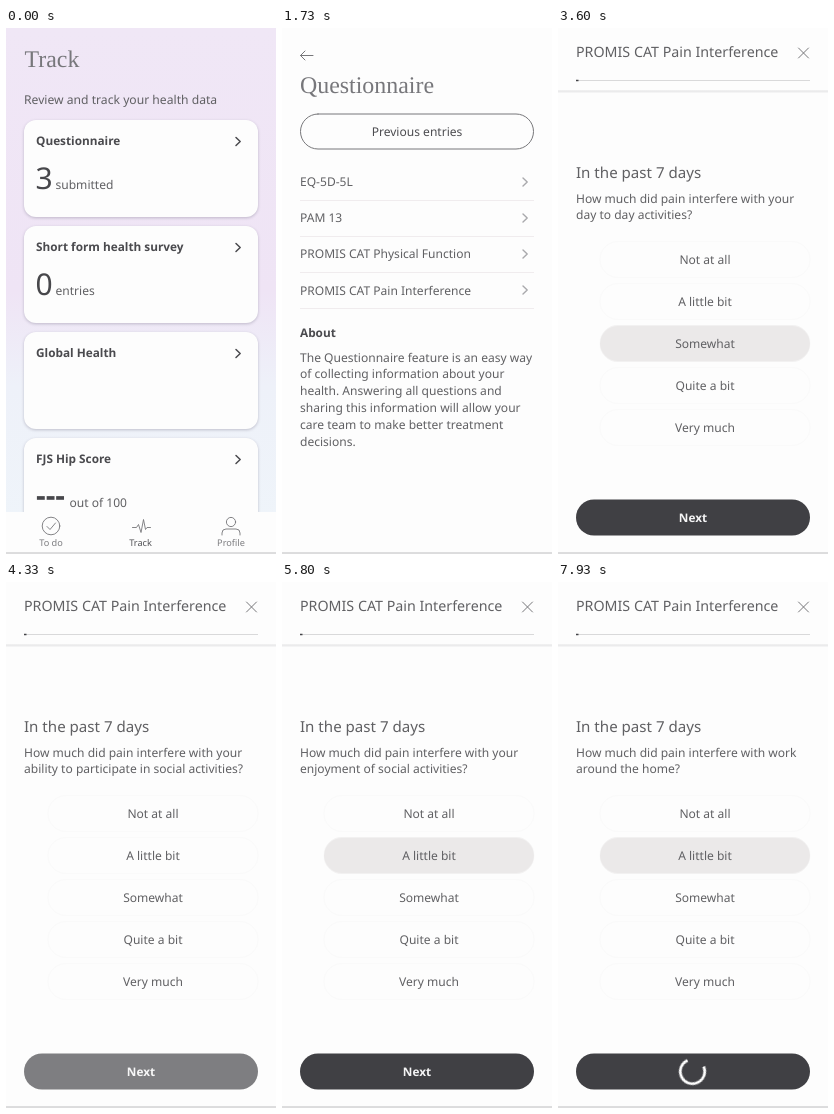
Write an HTML page that moves like this. It is 270 px wide and 526 px high and loops after 8000 ms.

```html
<!DOCTYPE html>
<html lang="en">
<head>
<meta charset="utf-8">
<title>Health questionnaire</title>
<style>
html, body { margin: 0; width: 100%; height: 100%; overflow: hidden; background: #fdfdfd; }
svg { display: block; width: 270px; height: 526px; }
text { font: 12.05px "Noto Sans", "Open Sans", sans-serif; fill: #606063; white-space: pre; text-rendering: geometricPrecision; }
.title { font: 23.9px "Liberation Serif", serif; fill: #77777b; }
.semi { font-size: 11.8px; font-weight: 600; fill: #4a4a4e; }
.medium { font-weight: 500; fill: #4c4c50; }
.big { font-size: 30px; fill: #47474b; }
.dash { font-weight: 700; }
.tab { font-size: 9.2px; fill: #7d7d80; }
.head { font-size: 14.25px; }
.lead { font-size: 15.1px; }
.mid { text-anchor: middle; }
.line { fill: none; stroke: #77777a; stroke-linecap: round; stroke-linejoin: round; }
.card { fill: #fdfdfd; filter: drop-shadow(0 1px 1.5px #76708866); }
.page { fill: #fdfdfd; }

/* One shared 8 s clock, hard steps */
.anim { animation: 8s step-end infinite; }
#track { animation-name: track; }
#list { animation-name: list; }
#survey { animation-name: survey; }
#q1 { animation-name: q1; }
#q2 { animation-name: q2; }
#q3 { animation-name: q3; }
#q4 { animation-name: q4; }
#pickSome { animation-name: pick-some; }
#pickLittle { animation-name: pick-little; }
#next { animation-name: press; }
#label { animation-name: label; }
#loader { animation-name: loader; }
#spin { animation: spin 1s steps(15) infinite; }

@keyframes track {
  0% { transform: none; }
  16.625% { transform: translateX(-10px); }
  17.5% { transform: translateX(-35px); }
  18.375% { transform: translateX(-55px); }
  19.125% { transform: translateX(-68px); }
  20% { transform: translateX(-76px); }
  20.875%, 100% { transform: translateX(-81px); }
}
@keyframes list {
  0% { transform: translateX(270px); }
  16.625% { transform: translateX(236px); }
  17.5% { transform: translateX(152px); }
  18.375% { transform: translateX(84px); }
  19.125% { transform: translateX(42px); }
  20% { transform: translateX(18px); }
  20.875% { transform: translateX(6px); }
  21.625%, 100% { transform: none; }
}
@keyframes survey {
  0% { transform: translateY(530px); }
  30% { transform: translateY(390px); }
  30.875% { transform: translateY(190px); }
  31.625% { transform: translateY(72px); }
  32.5% { transform: translateY(16px); }
  33.375%, 100% { transform: none; }
}
@keyframes q1 { 0% { opacity: 1; } 53.375%, 100% { opacity: 0; } }
@keyframes q2 { 0% { opacity: 0; } 53.375% { opacity: 1; } 66.625%, 100% { opacity: 0; } }
@keyframes q3 { 0% { opacity: 0; } 66.625% { opacity: 1; } 80.875%, 100% { opacity: 0; } }
@keyframes q4 { 0% { opacity: 0; } 80.875%, 100% { opacity: 1; } }
@keyframes pick-some { 0% { opacity: 0; } 45% { opacity: 1; } 53.375%, 100% { opacity: 0; } }
@keyframes pick-little {
  0%, 66.625%, 80.875% { opacity: 0; }
  57.5%, 72.5%, 86.625%, 100% { opacity: 1; }
}
@keyframes press {
  0%, 55.875%, 69.125%, 83.375%, 95.875%, 100% { opacity: 1; }
  50.875%, 55%, 65%, 68.375%, 78.375%, 82.5%, 93.375%, 95% { opacity: .87; }
  51.625%, 54.125%, 65.875%, 79.125%, 81.625%, 94.125% { opacity: .667; }
  52.5%, 53.375%, 80%, 80.875% { opacity: .55; }
}
@keyframes label { 0% { opacity: 1; } 95.875%, 100% { opacity: 0; } }
@keyframes loader { 0% { opacity: 0; } 95.875%, 100% { opacity: 1; } }
@keyframes spin { from { transform: rotate(24deg); } to { transform: rotate(384deg); } }
</style>
</head>
<body>
<svg viewBox="0 0 270 526">
  <defs>
    <linearGradient id="sky" x2="0" y2="1">
      <stop offset="0" stop-color="#f0e7f6"/>
      <stop offset=".5" stop-color="#efe4f5"/>
      <stop offset=".68" stop-color="#eef1f9"/>
      <stop offset="1" stop-color="#eff5fa"/>
    </linearGradient>
    <linearGradient id="fade" x2="0" y2="1">
      <stop offset="0" stop-color="#e2e2e3"/>
      <stop offset="1" stop-color="#fdfdfd"/>
    </linearGradient>
    <path id="chev" d="M0-4 4.2 0 0 4" fill="none" stroke-linecap="round" stroke-linejoin="round"/>
    <g id="card">
      <rect class="card" x="18" y="0" width="234" height="97" rx="12"/>
      <use href="#chev" x="230" y="21.5" stroke="#4a4a4e" stroke-width="1.5"/>
    </g>
    <g id="row">
      <use href="#chev" x="241" y="0" stroke="#a9a9ac" stroke-width="1.4"/>
      <path d="M18 18.5H252" stroke="#f0ecee"/>
    </g>
    <rect id="pill" x="42" width="210" height="36" rx="18"/>
  </defs>

  <g id="track" class="anim">
    <rect width="270" height="526" fill="url(#sky)"/>
    <text class="title" x="18.5" y="39">Track</text>
    <text x="18" y="75.5" style="font-size:12.15px">Review and track your health data</text>
    <use href="#card" y="92"/>
    <use href="#card" y="198"/>
    <use href="#card" y="304"/>
    <use href="#card" y="410"/>
    <text class="semi" x="30" y="117">Questionnaire</text>
    <text class="semi" x="30" y="223">Short form health survey</text>
    <text class="semi" x="30" y="329">Global Health</text>
    <text class="semi" x="30" y="435">FJS Hip Score</text>
    <text class="big" x="29.5" y="161">3</text>
    <text x="49.5" y="161">submitted</text>
    <text class="big" x="29.5" y="267">0</text>
    <text x="49.5" y="267">entries</text>
    <text class="big dash" x="30" y="478">---</text>
    <text x="63.5" y="478.5">out of 100</text>
    <rect class="page" y="484" width="270" height="42"/>
    <g class="line" stroke-width=".9">
      <circle cx="45" cy="498" r="8.8"/>
      <path d="M41 498.5l3 3 5.5-6.5"/>
      <path d="M126.5 499.5h4l2-3 2.5 8 2.5-13 2 10 1.5-2h3.500"/>
      <circle cx="225" cy="494" r="4.6"/>
      <path d="M216 507v-2q0-4 4-4h10q4 0 4 4v2"/>
    </g>
    <text class="tab mid" x="45" y="518">To do</text>
    <text class="tab mid" x="134.5" y="518" style="fill:#545458">Track</text>
    <text class="tab mid" x="225" y="518">Profile</text>
  </g>

  <g id="list" class="anim">
    <rect class="page" width="270" height="526"/>
    <path class="line" d="M31 27.5H18.5M23 23l-4.5 4.5 4.5 4.5"/>
    <text class="title" x="18" y="65">Questionnaire</text>
    <rect class="line" x="18.5" y="86" width="233" height="35" rx="17.5"/>
    <text class="medium mid" x="135" y="107.5">Previous entries</text>
    <text x="18" y="158">EQ-5D-5L</text>
    <text x="18" y="194">PAM 13</text>
    <text x="18" y="230">PROMIS CAT Physical Function</text>
    <text x="18" y="266.5">PROMIS CAT Pain Interference</text>
    <use href="#row" y="154"/>
    <use href="#row" y="190"/>
    <use href="#row" y="226"/>
    <use href="#row" y="262"/>
    <text class="semi" x="18" y="308.5">About</text>
    <text y="333.5">
      <tspan x="18">The Questionnaire feature is an easy way</tspan>
      <tspan x="18" dy="16.8">of collecting information about your</tspan>
      <tspan x="18" dy="16.8">health. Answering all questions and</tspan>
      <tspan x="18" dy="16.8">sharing this information will allow your</tspan>
      <tspan x="18" dy="16.8">care team to make better treatment</tspan>
      <tspan x="18" dy="16.8">decisions.</tspan>
    </text>
  </g>

  <g id="survey" class="anim">
    <rect class="page" width="270" height="526"/>
    <text class="head" x="18" y="29">PROMIS CAT Pain Interference</text>
    <path class="line" d="M240.5 20l10 10m0-10l-10 10"/>
    <path d="M18 52.5H252" stroke="#d9d9da"/>
    <path d="M18 52.5h2.5" stroke="#434347" stroke-width="1.5"/>
    <rect y="62.5" width="270" height="3" fill="url(#fade)"/>
    <text class="lead" x="18" y="150">In the past 7 days</text>

    <g id="q1" class="anim">
      <text x="18" y="175">How much did pain interfere with your</text>
      <text x="18" y="191">day to day activities?</text>
    </g>
    <g id="q2" class="anim">
      <text x="18" y="175">How much did pain interfere with your</text>
      <text x="18" y="191">ability to participate in social activities?</text>
    </g>
    <g id="q3" class="anim">
      <text x="18" y="175">How much did pain interfere with your</text>
      <text x="18" y="191">enjoyment of social activities?</text>
    </g>
    <g id="q4" class="anim">
      <text x="18" y="175">How much did pain interfere with work</text>
      <text x="18" y="191">around the home?</text>
    </g>

    <g fill="none" stroke="#fafafa">
      <use href="#pill" y="213.5"/>
      <use href="#pill" y="255.5"/>
      <use href="#pill" y="297.5"/>
      <use href="#pill" y="339.5"/>
      <use href="#pill" y="381.5"/>
    </g>
    <g fill="#ebe9e9">
      <use id="pickLittle" class="anim" href="#pill" y="255.5"/>
      <use id="pickSome" class="anim" href="#pill" y="297.5"/>
    </g>
    <text class="mid" x="147" y="235.5">Not at all</text>
    <text class="mid" x="147" y="277.5">A little bit</text>
    <text class="mid" x="147" y="319.5">Somewhat</text>
    <text class="mid" x="147" y="361.5">Quite a bit</text>
    <text class="mid" x="147" y="403.5">Very much</text>

    <g id="next" class="anim">
      <rect x="18" y="471.5" width="234" height="36" rx="18" fill="#404044"/>
      <g id="label" class="anim">
        <text class="semi mid" x="135" y="493.5" style="fill:#f4f4f5">Next</text>
      </g>
      <g id="loader" class="anim">
        <g transform="translate(134.5 489.5)">
          <path id="spin" d="M12.2 0A12.2 12.2 0 1 1 0-12.2" fill="none" stroke="#fdfdfd" stroke-width="2.8"/>
        </g>
      </g>
    </g>
  </g>

  <path d="M0 525H270" stroke="#bcbcbe"/>
</svg>
</body>
</html>
```
